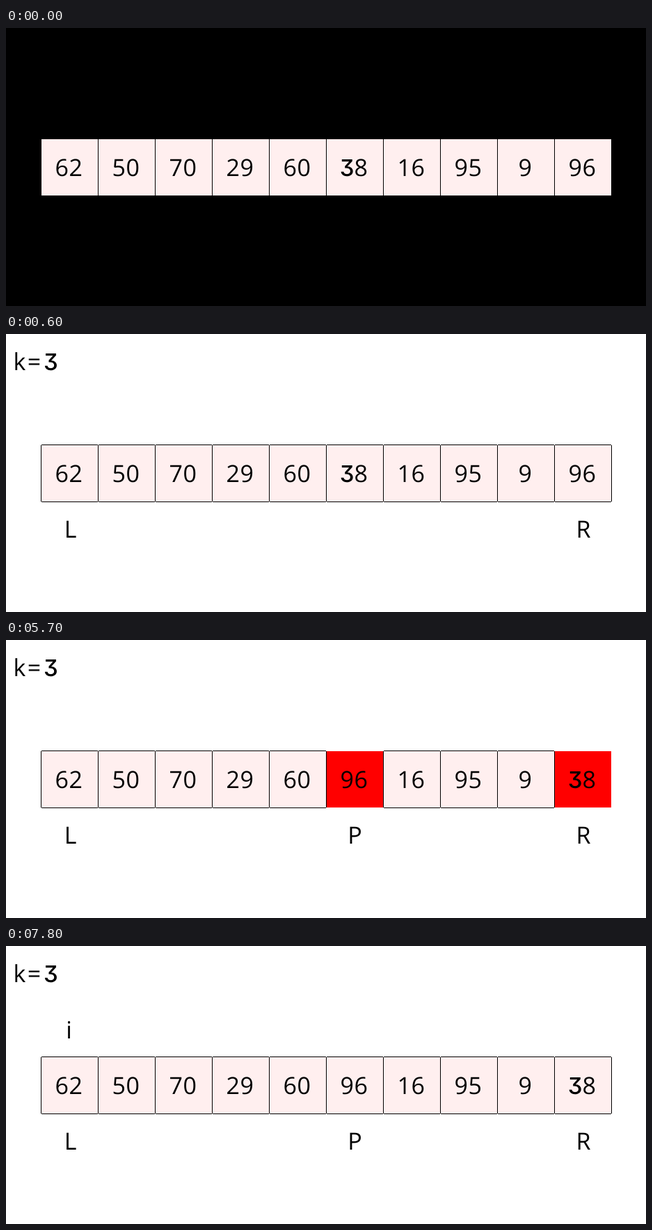
Animation, 920 px wide and 400 px high, one loop 8000 ms. Source, as an HTML page:

```html
<!DOCTYPE html>
<html lang="en">
<head>
<meta charset="utf-8">
<title>Quickselect</title>
<style>
  html, body { margin: 0; width: 100%; height: 100%; overflow: hidden; background: #000; }
  svg { display: block; }
  rect { shape-rendering: crispEdges; }
  text {
    font: 500 34px "Open Sans", "Noto Sans", sans-serif;
    text-anchor: middle;
    text-rendering: geometricPrecision;
  }
  .flat { font: 500 33px Inter, "Open Sans", sans-serif; font-feature-settings: "cv09"; }
</style>
</head>
<body>
<svg id="stage" width="920" height="400" viewBox="0 0 920 400"></svg>
<script>
const stage = document.getElementById("stage");
const LOOP = 8000, SIZE = 82, LEFT = 50, TOP = 159;
const START = [62, 50, 70, 29, 60, 38, 16, 95, 9, 96];
const FIRST = 0, PIVOT = 5, LAST = 9;
const STEPS = [0, 300, 600, 3600, 5100, 5700, 6600, 7800];

const rect = (x, y, w, h, fill) =>
  `<rect x="${x}" y="${y}" width="${w}" height="${h}" fill="${fill}"/>`;

const glyph = (ch, x, y) =>
  `<text x="${x}" y="${y}"${ch === "3" ? ' class="flat"' : ""}>${ch}</text>`;

// Monospaced lettering with a 20 px advance, centred on x
const label = (str, x, y) =>
  [...str].map((ch, i) => glyph(ch, x + 20 * (i - (str.length - 1) / 2), y)).join("");

const middle = i => LEFT + SIZE * (i + 0.5);

function border(x) {
  const n = SIZE - 1;
  return rect(x + 1, TOP, n, 1, "#000") + rect(x + 1, TOP + SIZE, n, 1, "#000") +
    rect(x, TOP + 1, 1, n, "#000") + rect(x + SIZE, TOP + 1, 1, n, "#000");
}

function cell(value, i, hot) {
  const x = LEFT + SIZE * i;
  return (hot ? "" : border(x)) +
    rect(x + 1, TOP + 1, SIZE - 1, SIZE - 1, hot ? "#f00" : "#ffefef") +
    label(String(value), middle(i) - 0.8, 213.2);
}

function scene(t) {
  const values = START.slice();
  if (t >= 5700) [values[PIVOT], values[LAST]] = [values[LAST], values[PIVOT]];
  const swapping = t >= 5100 && t < 6600;

  let out = rect(0, 0, 920, 400, t < 300 ? "#000" : "#fff");
  out += values.map((v, i) => cell(v, i, swapping && (i === PIVOT || i === LAST))).join("");
  if (t >= 300) out += glyph("k", 19.5, 52) + glyph("=", 40.5, 52) + glyph("3", 64.5, 52);
  if (t >= 600) out += glyph("L", middle(FIRST) + 1.5, 293) + glyph("R", middle(LAST) + 1, 293);
  if (t >= 3600) out += glyph("P", middle(PIVOT) + 0.5, 293);
  if (t >= 7800) out += glyph("i", middle(FIRST) - 0.5, 133);
  return out;
}

let shown = -1;
const begin = performance.now();
function tick() {
  const t = Math.max(0, performance.now() - begin) % LOOP;
  const step = STEPS.filter(s => s <= t).length - 1;
  if (step !== shown) {
    shown = step;
    stage.innerHTML = scene(STEPS[step]);
  }
  requestAnimationFrame(tick);
}
tick();
</script>
</body>
</html>
```
